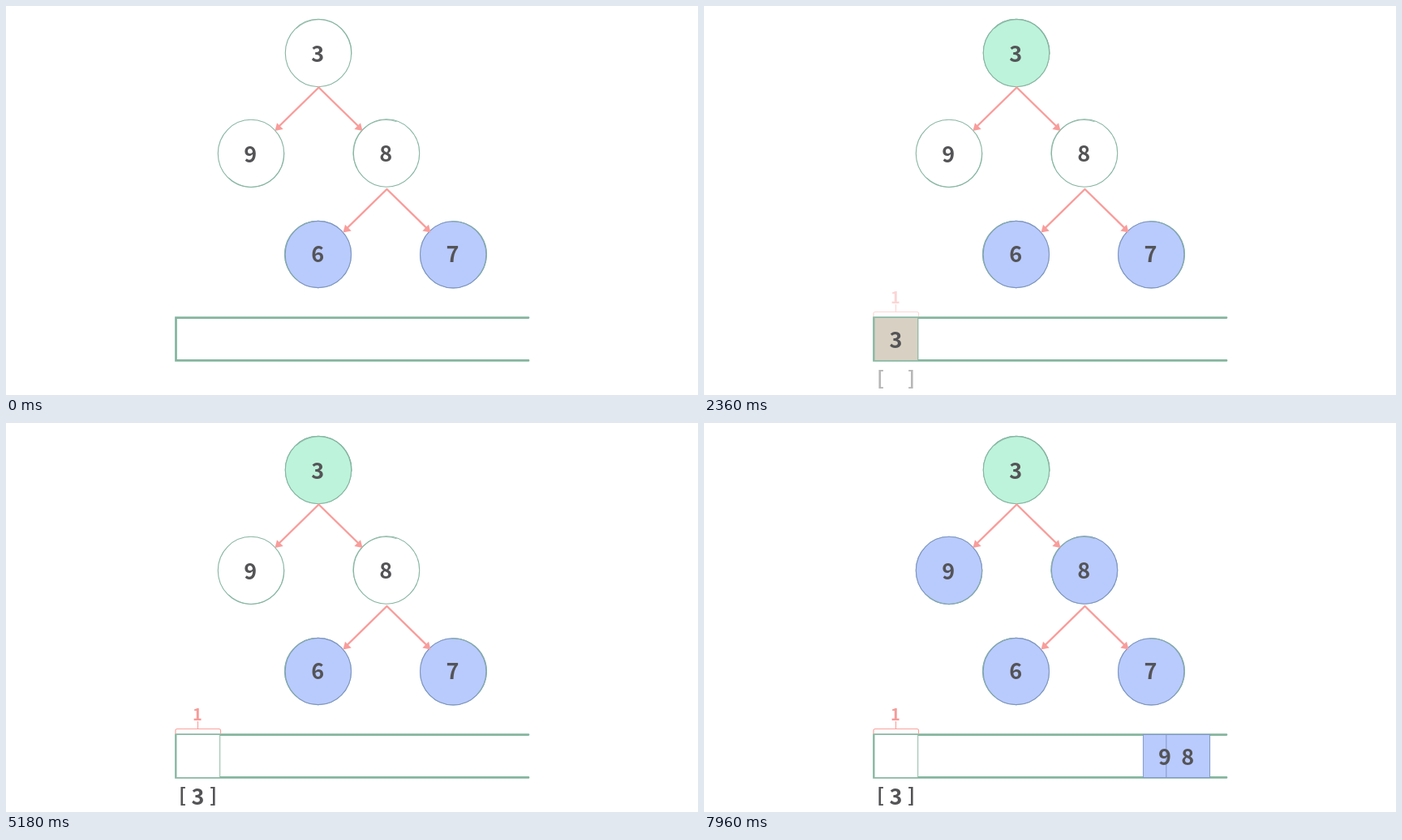
These frames come from a looping animation (853x480 px, 8000 ms). An HTML page:

```html
<!DOCTYPE html>
<html lang="en">
<head>
<meta charset="utf-8">
<title>Level order traversal</title>
<style>
  html, body { margin: 0; width: 100%; height: 100%; overflow: hidden; background: #fff; }
  svg { display: block; width: 853px; height: 480px; }
  text { font: bold 27px "Noto Sans CJK SC", "Noto Sans CJK JP", "Noto Sans", sans-serif; fill: #545457; text-anchor: middle; }
  .ring { fill: none; stroke: #86b5a2; stroke-width: 1.1; }
  .blue { fill: #b9cafc; stroke: #7f95c4; }
  .arrow { fill: none; stroke: #f89d9b; stroke-width: 2.4; stroke-linejoin: round; }
  .head { fill: #f89d9b; }
  .queue { fill: none; stroke: #84b59e; stroke-width: 2.7; stroke-linecap: round; }
  .card { stroke: #8cb9a5; stroke-width: 1; }
  .brace { fill: none; stroke: #f9a19e; stroke-width: 1.2; }
  .count { font-size: 20px; fill: #f69b99; }
  .bracket { font-size: 24px; }
</style>
</head>
<body>
<svg id="stage" viewBox="0 0 853 480"></svg>
<script>
const LOOP = 8000, TICK = 60, OFFSTAGE = 876;
const stage = document.getElementById('stage');

function add(parent, tag, attrs, text) {
  const el = document.createElementNS('http://www.w3.org/2000/svg', tag);
  for (const key in attrs) el.setAttribute(key, attrs[key]);
  if (text) el.textContent = text;
  parent.appendChild(el);
  return el;
}
const group = (parent = stage) => add(parent, 'g', {});
const label = (parent, x, y, text, cls = '') => add(parent, 'text', { x, y, class: cls }, text);

// Tree: value, centre x, centre y, tilt of the loose second stroke
const nodes = [[3, 385, 58, 20], [9, 302, 182, 150], [8, 469, 181.5, -55], [6, 384.8, 306.5, -80], [7, 551.2, 306.8, 60]];
const fills = {};
for (const [value, x, y, tilt] of nodes) {
  const rx = 40.7, ry = value === 6 || value === 7 ? 41.1 : 41.7;
  const ring = (parent, cls) => {
    const el = add(parent, 'ellipse', { cx: x, cy: y, rx, ry, class: cls });
    add(parent, 'path', {
      class: 'ring', 'stroke-opacity': .75,
      d: `M-36 -19A40.5 40.8 0 0 1 39 -12`,
      transform: `translate(${x} ${y}) rotate(${tilt})`
    });
    return el;
  };
  ring(stage, 'ring');
  fills[value] = group();
  ring(fills[value], value === 3 ? 'ring' : 'ring blue');
  if (value === 3) fills[3].firstChild.style.fill = '#bdf3da';
  label(stage, x - .7, y + (value === 3 ? 11 : value === 9 || value === 8 ? 10.8 : 9.5), value);
}

function fork(x, y) {
  add(stage, 'path', { class: 'arrow', d: `M${x - 49} ${y + 48}L${x} ${y}L${x + 49} ${y + 48}` });
  for (const side of [-1, 1]) {
    add(stage, 'path', {
      class: 'head',
      d: 'M54 53.5L51.5 43.7L43.8 51.6Z',
      transform: `translate(${x} ${y}) scale(${side} 1)`
    });
  }
}
fork(385.5, 100.5);
fork(469.5, 226);

add(stage, 'path', { class: 'queue', d: 'M644 384.6H209.5V437.4H644' });

// Cards are laid out around x = 0 and moved by translation
const cardBox = { x: -26.5, y: 384.5, width: 53.7, height: 53, class: 'card' };
const box = (parent, fill) => add(parent, 'rect', { ...cardBox, fill });
const first = group();
box(first, '#fff');
const green = box(first, '#bff3dc');
const red = box(first, '#fda3a1');
const digit = label(first, 0, 422, '3');

const next = [[9, 291], [8, 345]].map(([value, home]) => {
  const card = group();
  box(card, '#b9cafc').style.stroke = '#8098c8';
  return { value, home, card };
});
for (const n of next) n.text = label(stage, 0, 422, n.value);

const marks = group();
add(marks, 'path', { class: 'brace', d: 'M209 383.5V379.5Q209 377.5 211 377.5H262.5Q264.5 377.5 264.5 379.5V383.5M236.5 377.5V368' });
label(marks, 236, 366.5, '1', 'count');
label(marks, 217.5, 468, '[', 'bracket');
label(marks, 255.5, 468, ']', 'bracket');

// Stepped linear progress
function progress(t, start, length, lead) {
  if (t < start) return 0;
  return Math.min(1, (Math.floor((t - start) / TICK) * TICK + lead) / length);
}
const slideX = (home, p) => OFFSTAGE + (home - OFFSTAGE) * p;
const show = (el, on) => el.setAttribute('visibility', on ? 'visible' : 'hidden');
const place = (el, x) => el.setAttribute('transform', `translate(${x} 0)`);

function draw(t) {
  const enter = progress(t, 1170, 450, 57);
  const mark = progress(t, 2120, 700, 50);
  const drop = progress(t, 4520, 700, 50);
  const tint = progress(t, 6920, 660, 60);
  const follow = progress(t, 7780, 450, 57);

  show(fills[3], t >= 500);
  fills[9].style.opacity = fills[8].style.opacity = tint;

  show(first, enter > 0);
  place(first, slideX(236.5, enter));
  show(green, enter > 0 && mark < 1);
  red.style.opacity = mark * (1 - drop);
  digit.setAttribute('y', 422 + 49 * drop);
  marks.style.opacity = mark;

  for (const { home, card, text } of next) {
    for (const el of [card, text]) {
      show(el, follow > 0);
      place(el, slideX(home, follow));
    }
  }
}

function frame() {
  draw(performance.now() % LOOP);
  requestAnimationFrame(frame);
}
frame();
</script>
</body>
</html>
```
